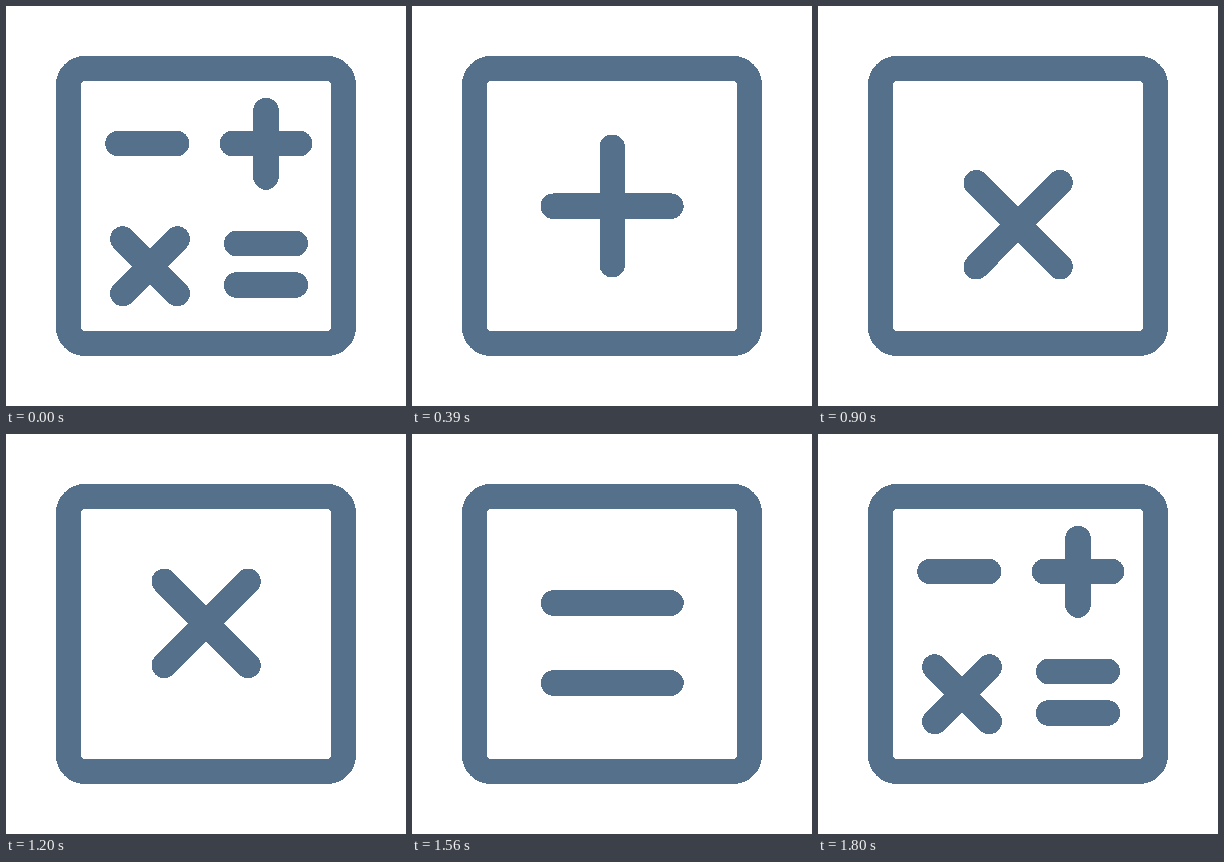
Recreate the animation shown at these times as an HTML page. Size 400 by 400 pixels, loop 3830 ms.

```html
<!DOCTYPE html>
<html lang="en">
<head>
<meta charset="utf-8">
<title>Calculator icon</title>
<style>
  html, body { margin: 0; width: 100%; height: 100%; overflow: hidden; background: #fff; }
  svg { display: block; width: 100vw; height: 100vh; shape-rendering: crispEdges; }
  path, .frame { fill: none; stroke: #55708a; stroke-width: 25.5; stroke-linecap: round; }
  .frame { stroke-width: 25; }
</style>
</head>
<body>
<svg viewBox="0 0 400 400">
  <defs>
    <clipPath id="inside"><rect x="62" y="62" width="276" height="276"/></clipPath>
  </defs>
  <g clip-path="url(#inside)">
    <g id="left">
      <path d="M112 137.5H170.5"/>
      <path d="M116.8 233L171.2 287.5M171.2 233L116.8 287.5"/>
    </g>
    <g id="right">
      <path d="M226.5 137.5H293.5M260 104.5V171"/>
      <path d="M230.7 237.5H289.3M230.7 279H289.3"/>
    </g>
    <path id="upright" d="M200.3 141.3V258.7"/>
    <path id="bar" d="M141.3 200.2H258.9"/>
    <path id="times" d="M158.3 158L242 242M242 158L158.3 242"/>
    <path id="equals" d="M141.5 160H259M141.5 240H259"/>
  </g>
  <rect class="frame" x="62.5" y="62.5" width="275" height="275" rx="16.5"/>
</svg>
<script>
  const LOOP = 3830, STEP = 30;
  const UP = -200, DOWN = 200, ASIDE = 272;

  const curve = (a, b, s) => 3 * a * s * (1 - s) ** 2 + 3 * b * s * s * (1 - s) + s ** 3;

  // Cubic bezier easing that dips back, shoots past 1 and settles.
  function swing(p) {
    if (p <= 0 || p >= 1) return p;
    let lo = 0, hi = 1;
    for (let i = 0; i < 24; i++) {
      const mid = (lo + hi) / 2;
      if (curve(0.75, 0.15, mid) < p) lo = mid; else hi = mid;
    }
    return curve(-0.6, 1.43, lo);
  }

  // Progress of one change, from 0 to 1.
  const beat = (start, length = 210) => t => Math.min(1, Math.max(0, (t - start) / length));
  const toPlus = beat(30), toMinus = beat(390), toTimes = beat(780);
  const toEquals = beat(1170), toAll = beat(1530, 270);

  function move(id, x, y) {
    document.getElementById(id).setAttribute("transform", `translate(${x} ${y})`);
  }

  // A sign swings in on one beat and leaves by the same motion reversed.
  function sign(id, t, enter, exit, from, to = from) {
    const gone = exit(t);
    const away = 1 - swing(Math.min(enter(t), 1 - gone));
    move(id, 0, away * (gone > 0 ? to : from));
  }

  function draw() {
    const t = Math.floor((performance.now() % LOOP) / STEP) * STEP;
    const aside = ASIDE * (1 - swing(Math.max(1 - toPlus(t), toAll(t))));
    move("left", -aside, 0);
    move("right", aside, 0);
    sign("upright", t, toPlus, toMinus, UP);
    sign("bar", t, toPlus, toTimes, UP, DOWN);
    sign("times", t, toTimes, toEquals, DOWN);
    sign("equals", t, toEquals, toAll, UP);
    requestAnimationFrame(draw);
  }
  draw();
</script>
</body>
</html>
```
